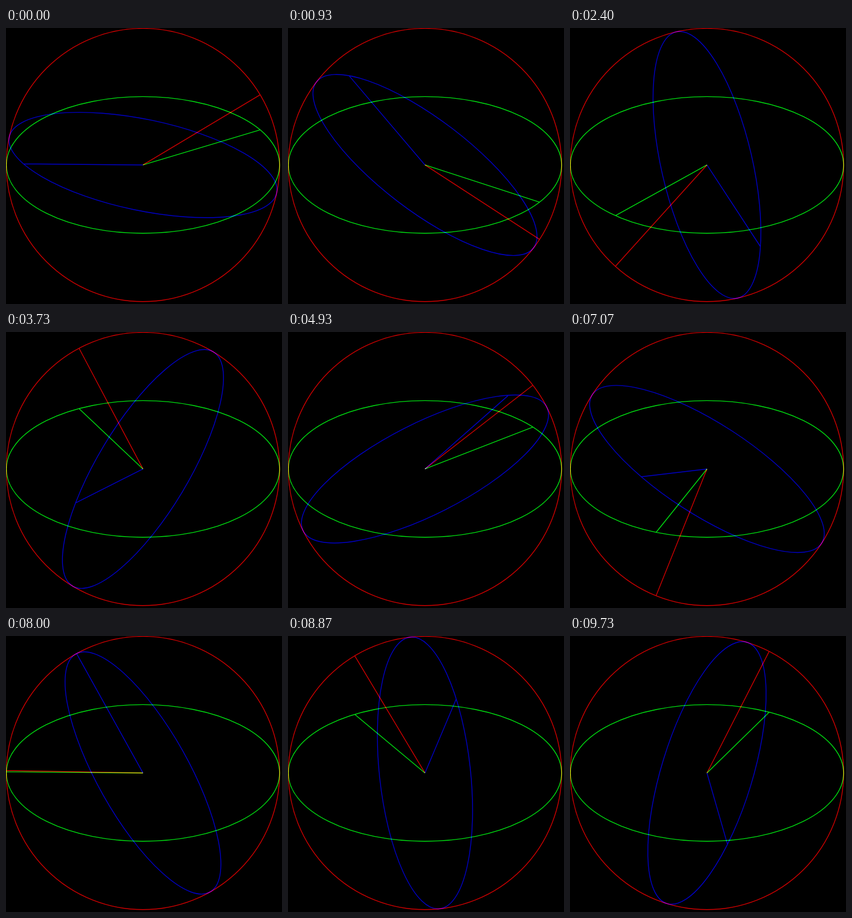
Animation, 480 px wide and 480 px high, one loop 9.79 s. Source, as an HTML page with a canvas:

```html
<!DOCTYPE html>
<html>
<head>
<meta charset="utf-8">
<style>
  html, body { margin: 0; width: 100%; height: 100%; overflow: hidden; background: #000; }
  canvas { display: block; }
</style>
</head>
<body>
<canvas id="stage" width="480" height="480"></canvas>
<script>
const ctx = document.getElementById('stage').getContext('2d');
const LOOP = 9790, STEP = 1000 / 15;
const CENTER = 238.2, RADIUS = 237.6;

// The sweep speeds up and slows down: [step, degrees clockwise]
const sweep = [[0, -30.9], [14, 33], [36, 132.1], [56, 242.1], [91, 397.8], [120, 541], [146, 657.1]];

function sweepAngle(step) {
  let i = 1;
  while (i < sweep.length - 1 && step > sweep[i][0]) i++;
  const [s0, a0] = sweep[i - 1], [s1, a1] = sweep[i];
  return a0 + (a1 - a0) * (step - s0) / (s1 - s0);
}

// An ellipse with a hand from its centre to the point at the given angle
function orbit(color, flatten, angle, tilt = 0) {
  const minor = RADIUS / flatten;
  ctx.save();
  ctx.translate(CENTER, CENTER);
  ctx.rotate(tilt);
  ctx.strokeStyle = color;
  ctx.beginPath();
  ctx.ellipse(0, 0, RADIUS, minor, 0, 0, 2 * Math.PI);
  ctx.moveTo(0, 0);
  ctx.lineTo(RADIUS * Math.cos(angle), minor * Math.sin(angle));
  ctx.stroke();
  ctx.restore();
}

function draw(now) {
  const time = Math.floor(now % LOOP / 10) * 10;
  const degrees = sweepAngle(Math.floor((time + 5) / STEP));
  const angle = degrees * Math.PI / 180;
  const tilt = (204.2 + 0.4 * degrees) * Math.PI / 180;

  ctx.globalCompositeOperation = 'source-over';
  ctx.fillStyle = '#000';
  ctx.fillRect(0, 0, 480, 480);
  ctx.globalCompositeOperation = 'lighter';
  ctx.lineWidth = 1.4;
  orbit('#d00000', 1, angle);
  orbit('#00e010', 2, angle);
  orbit('#0000c8', 3, angle, tilt);
}

const start = performance.now();
function tick() {
  draw(performance.now() - start);
  requestAnimationFrame(tick);
}
tick();
</script>
</body>
</html>
```
